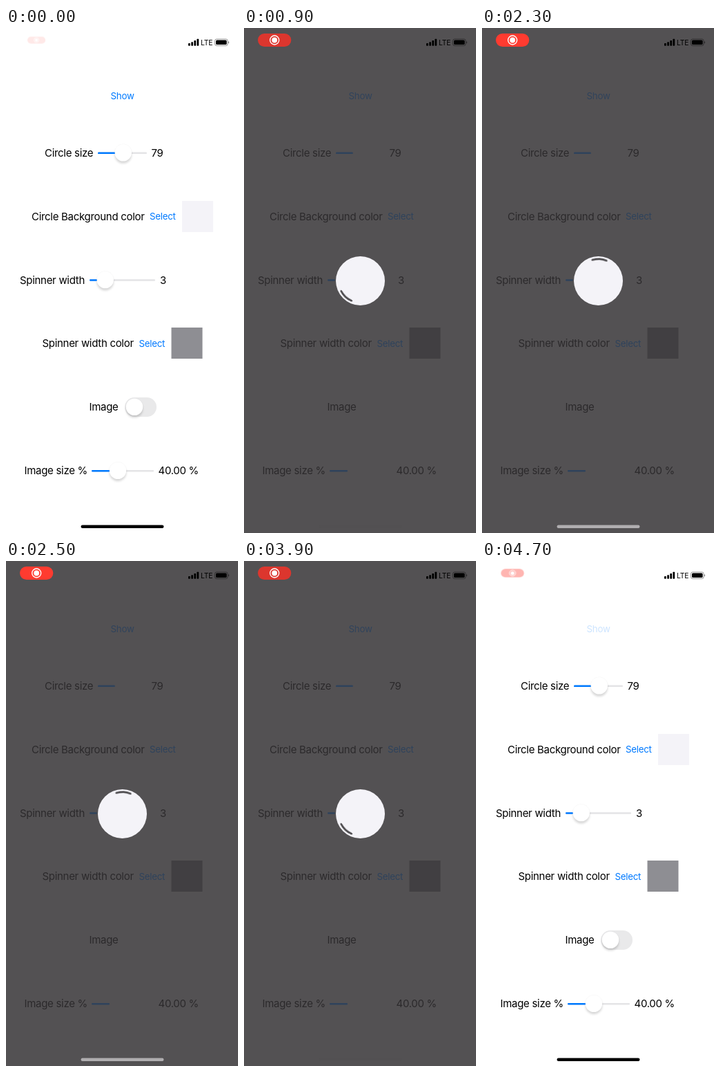
An HTML page that plays this animation: 336 px wide and 730 px high, repeating every 4.8 s.

```html
<!DOCTYPE html>
<html lang="en">
<head>
<meta charset="utf-8">
<title>Spinner settings</title>
<style>
  html, body { margin: 0; width: 100%; height: 100%; overflow: hidden; background: #fff; }
  svg { display: block; width: 336px; height: 730px; }
  text { font: 15px Inter, "Liberation Sans", sans-serif; letter-spacing: -.3px; }
  .button { font-size: 13.3px; letter-spacing: -.25px; }
  .carrier { font-size: 10.3px; letter-spacing: -.1px; }

  /* Every animation is scrubbed by --t, in ms */
  .pale, .veil, .blue, .show, .disc, .spin, .arc, .bar, .pill, .red {
    animation: 2400ms linear both paused;
    animation-delay: calc(var(--t, 0) * -1ms);
  }
  .pale { animation-name: pale; }
  .veil { animation-name: veil; fill: #333133; }
  .blue { animation-name: blue; }
  .show { animation-name: show; }
  .disc { animation-name: disc; }
  .spin { animation-name: spin; transform-origin: 168.5px 365.5px; }
  .arc  { animation-name: arc; }
  .bar  { animation-name: bar; }
  .pill { animation-name: pill; transform-origin: 44px 17.5px; }
  .red  { animation-name: red; }

  @keyframes pale { 0%, 12.5% { opacity: 1 } 25%, 100% { opacity: 0 } }
  @keyframes veil {
    0%, 4.167% { opacity: 0 } 8.333% { opacity: .28 } 12.5% { opacity: .63 }
    16.667% { opacity: .79 } 20.833% { opacity: .835 } 25%, 100% { opacity: .845 }
  }
  @keyframes blue {
    0%, 4.167% { fill: #007aff } 12.5% { fill: #3576b0 } 25%, 100% { fill: #2f435c }
  }
  @keyframes show {
    0% { opacity: 1 } 4.167% { opacity: .2 } 12.5% { opacity: .45 } 25%, 100% { opacity: .95 }
  }
  @keyframes disc {
    0%, 4.167% { opacity: 0 } 8.333% { opacity: .5 } 12.5% { opacity: .95 } 16.667%, 100% { opacity: 1 }
  }
  @keyframes spin {
    0% { transform: rotate(-90deg) } 12.5% { transform: rotate(14deg) }
    37.5% { transform: rotate(223deg) } 95.833% { transform: rotate(723deg) }
    100% { transform: rotate(759deg) }
  }
  @keyframes arc { 0%, 12.5% { stroke: #8e8e93 } 25%, 100% { stroke: #49474a } }
  @keyframes bar {
    0%, 4.167% { fill: #000 } 12.5% { fill: #201e20 }
    25%, 54.167% { fill: #525052 } 75%, 100% { fill: #b0aeb0 }
  }
  @keyframes pill {
    0% { transform: scale(.54, .52); opacity: .11 }
    4.167% { transform: scale(.69, .65); opacity: .38 }
    8.333% { transform: scale(.9, .88); opacity: .78 }
    12.5%, 100% { transform: none; opacity: 1 }
  }
  @keyframes red {
    0%, 4.167% { fill: #ff3b30 } 12.5% { fill: #f23f34 }
    25%, 54.167% { fill: #dc362e } 75%, 100% { fill: #ff3b30 }
  }
</style>
</head>
<body>
<svg viewBox="0 0 336 730">
  <defs>
    <filter id="soft" x="-50%" y="-50%" width="200%" height="200%">
      <feGaussianBlur stdDeviation="1.6"/>
    </filter>
    <g id="shadow">
      <circle cy="3.2" r="12.3" fill-opacity=".15" filter="url(#soft)"/>
      <circle r="12.7" fill-opacity=".04"/>
    </g>
    <circle id="knob" r="12.3" fill="#fff"/>
  </defs>

  <rect width="336" height="730" fill="#fff"/>

  <g class="pale">
    <g fill="#e4e4e6">
      <rect x="133" y="179.6" width="71" height="2.4" rx="1.2"/>
      <rect x="121" y="363.3" width="95" height="2.4" rx="1.2"/>
      <rect x="124" y="639" width="90" height="2.4" rx="1.2"/>
      <rect x="172" y="534" width="46" height="28" rx="14" fill="#e9e9ea"/>
    </g>
    <rect x="255" y="250" width="45" height="45" fill="#f4f3f8"/>
    <use href="#shadow" x="169.7" y="180.3"/>
    <use href="#shadow" x="143.7" y="364"/>
    <use href="#shadow" x="162" y="639.7"/>
    <use href="#shadow" x="186" y="547.8"/>
  </g>
  <use href="#knob" x="169.7" y="180.3"/>
  <use href="#knob" x="143.7" y="364"/>
  <use href="#knob" x="162" y="639.7"/>
  <use href="#knob" x="186" y="547.8"/>
  <rect x="239.5" y="433" width="45" height="45" fill="#8e8e93"/>

  <text x="56" y="186">Circle size</text>
  <text x="210.5" y="186">79</text>
  <text x="37" y="277.5">Circle Background color</text>
  <text x="20" y="369.5">Spinner width</text>
  <text x="223" y="369.5">3</text>
  <text x="52.5" y="461">Spinner width color</text>
  <text x="120.5" y="553.3">Image</text>
  <text x="26.5" y="645">Image size %</text>
  <text x="220.5" y="645">40.00 %</text>

  <rect class="veil" width="336" height="730"/>

  <g class="blue">
    <text class="button show" x="151.5" y="103">Show</text>
    <text class="button" x="208" y="277">Select</text>
    <text class="button" x="192.5" y="460.5">Select</text>
    <rect x="133" y="179.5" width="24.8" height="2.6" rx="1.2"/>
    <rect x="121" y="363.2" width="10.8" height="2.6" rx="1.2"/>
    <rect x="124" y="638.9" width="26" height="2.6" rx="1.2"/>
  </g>

  <g class="disc">
    <circle cx="168.5" cy="365.5" r="35.5" fill="#f4f3f8"/>
    <g class="spin">
      <path class="arc" d="M158.2 335.7A31.5 31.5 0 0 1 178.8 335.7" fill="none"
        stroke-width="2.6" stroke-linecap="round"/>
    </g>
  </g>

  <g class="pill">
    <rect class="red" x="20" y="8" width="48.3" height="19" rx="9.5"/>
    <circle cx="44.2" cy="17.5" r="6.5" fill="none" stroke="#fff" stroke-width="1.4"/>
    <circle cx="44.2" cy="17.5" r="3.9" fill="#fff"/>
  </g>

  <g>
    <rect x="264" y="22" width="2.8" height="3.8" rx=".7"/>
    <rect x="268.2" y="20.3" width="2.8" height="5.5" rx=".7"/>
    <rect x="272.3" y="18" width="2.8" height="7.8" rx=".7"/>
    <rect x="276.4" y="15.8" width="2.8" height="10" rx=".7"/>
    <text class="carrier" x="282" y="25">LTE</text>
    <rect x="302.5" y="16" width="18.6" height="9.6" rx="2.6" fill="none" stroke="#000" stroke-opacity=".45" stroke-width=".9"/>
    <rect x="304" y="17.5" width="15.6" height="6.6" rx="1.5"/>
    <path d="M322 19.2a1.7 1.7 0 0 1 0 3.2z" fill-opacity=".5"/>
  </g>

  <rect class="bar" x="108.5" y="718.6" width="120" height="4.4" rx="2.2"/>
</svg>
<script>
  const STEP = 100, LOOP = 4800;
  const start = performance.now();

  // Plays forward for half the loop, then backward, in 100 ms steps
  function draw() {
    const now = (performance.now() - start) % LOOP;
    const t = Math.floor(now / STEP) * STEP;
    document.documentElement.style.setProperty('--t', Math.min(t, LOOP - t));
    requestAnimationFrame(draw);
  }
  draw();
</script>
</body>
</html>
```
